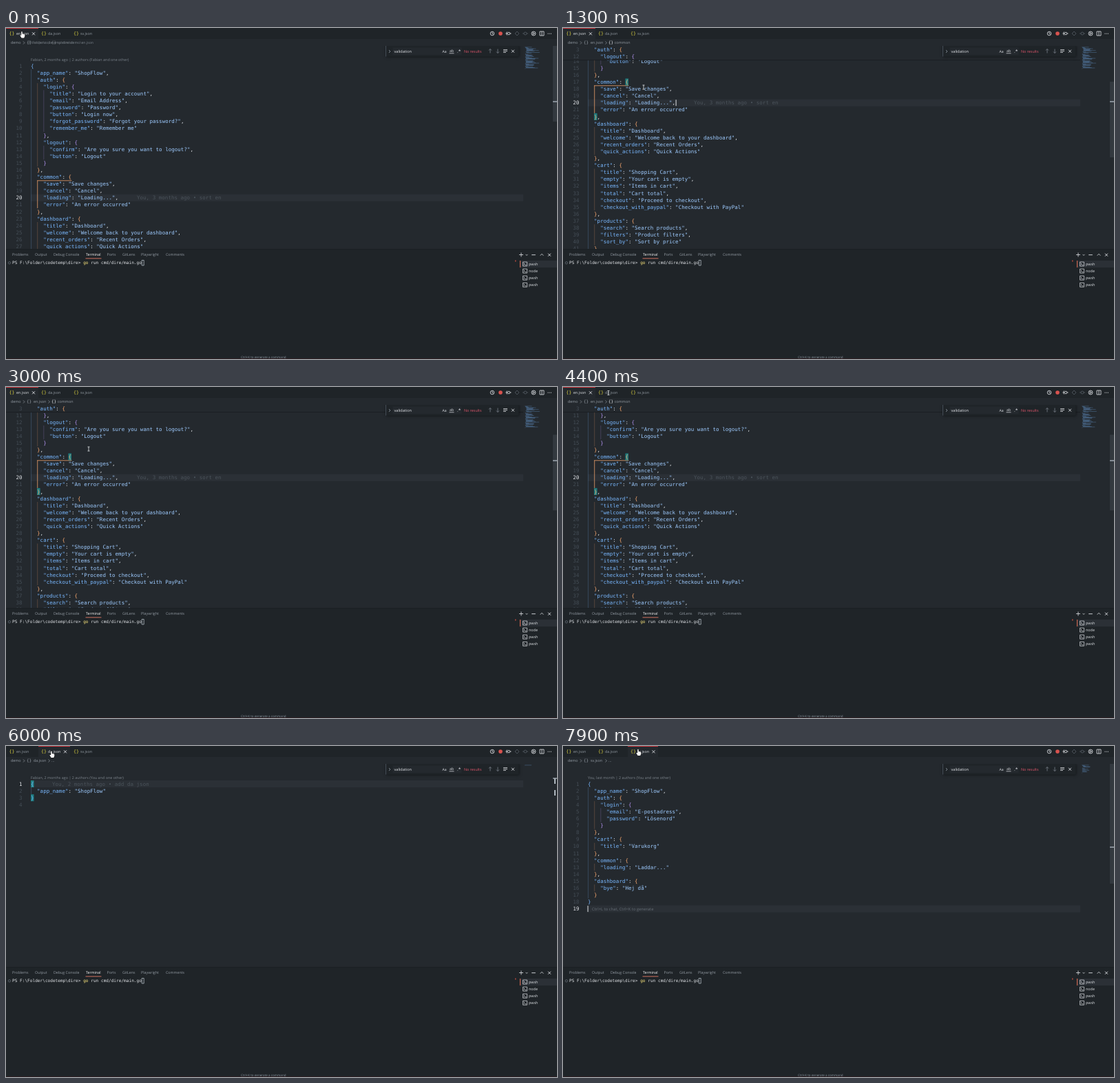
Animation, 800 px wide and 481 px high, one loop 8 s. Source, as an HTML page with a canvas:

```html
<!DOCTYPE html>
<html lang="en">
<head>
<meta charset="utf-8">
<style>
  html, body { margin: 0; overflow: hidden; background: #1f2428; }
  canvas { display: block; }
</style>
</head>
<body>
<canvas id="stage" width="800" height="481"></canvas>
<script>
const ctx = document.getElementById('stage').getContext('2d');
const LOOP = 8000, ROW = 10.09, FIRST = 55, TOP = 26, BOTTOM = 321, NOTCH = 23;
const CODE = 7.54, ADV = CODE * 0.602, LEFT = 36;
const MONO = '"DejaVu Sans Mono", monospace', UI = '"Open Sans", sans-serif';
const EDITOR = '#24292e', PANEL = '#1f2428', DIM = '#959da5', LIGHT = '#e1e4e8', FAINT = '#444d56';
const BRACKETS = ['#79b8ff', '#ffab70', '#b392f0'];

const english = {
  app_name: 'ShopFlow',
  auth: {
    login: {
      title: 'Login to your account', email: 'Email Address', password: 'Password',
      button: 'Login now', forgot_password: 'Forgot your password?', remember_me: 'Remember me'
    },
    logout: { confirm: 'Are you sure you want to logout?', button: 'Logout' }
  },
  common: { save: 'Save changes', cancel: 'Cancel', loading: 'Loading...', error: 'An error occurred' },
  dashboard: {
    title: 'Dashboard', welcome: 'Welcome back to your dashboard',
    recent_orders: 'Recent Orders', quick_actions: 'Quick Actions'
  },
  cart: {
    title: 'Shopping Cart', empty: 'Your cart is empty', items: 'Items in cart', total: 'Cart total',
    checkout: 'Proceed to checkout', checkout_with_paypal: 'Checkout with PayPal'
  },
  products: { search: 'Search products', filters: 'Product filters', sort_by: 'Sort by price' },
  orders: { status: 'Order status', tracking: 'Track your order', api_webhook: 'API webhook notifications' }
};
const swedish = {
  app_name: 'ShopFlow',
  auth: { login: { email: 'E-postadress', password: 'Lösenord' } },
  cart: { title: 'Varukorg' },
  common: { loading: 'Laddar...' },
  dashboard: { bye: 'Hej då' }
};

// Lines plus the bracket blocks {start, end, depth} they form
function parse(data) {
  const lines = (JSON.stringify(data, null, 2) + '\n').split('\n');
  const blocks = [], open = [];
  lines.forEach((line, i) => {
    if (line.endsWith('{')) open.push({ start: i, depth: open.length });
    if (/^ *}/.test(line)) blocks.push({ ...open.pop(), end: i });
  });
  return { lines, blocks };
}

const files = [
  { name: 'en.json', x: 0, w: 47, icon: 4.5, label: 15, close: 40, active: 19, mark: 107, slider: 110,
    lens: 'Fabian, 2 months ago | 2 authors (Fabian and one other)',
    note: 'You, 3 months ago • sort en', noteX: 190, caretX: 164, match: [16, 21], ...parse(english) },
  { name: 'da.json', x: 47, w: 46, icon: 51, label: 61, close: 86, active: 0, mark: 47, slider: 0,
    lens: 'Fabian, 2 months ago | 2 authors (You and one other)',
    note: 'You, 2 months ago • add da json', noteX: 67, caretX: 36, match: [0, 2], ...parse({ app_name: 'ShopFlow' }) },
  { name: 'sv.json', x: 94, w: 44, icon: 98, label: 108, close: 131.5, active: 18, mark: 147, slider: 174,
    lens: 'You, last month | 2 authors (You and one other)',
    hint: 'Ctrl+L to chat, Ctrl+K to generate', caretX: 36, match: [], ...parse(swedish) }
];

function rect(x, y, w, h, color) {
  ctx.fillStyle = color;
  ctx.fillRect(x, y, w, h);
}

// Drawn at ten times the size and scaled down, which keeps fractional advances
function text(str, x, y, color, size = 5.4, font = UI, align = 'left') {
  ctx.save();
  ctx.translate(x, y + size * 0.35);
  ctx.scale(0.1, 0.1);
  ctx.font = `${size * 10}px ${font}`;
  ctx.textRendering = 'geometricPrecision';
  ctx.textAlign = align;
  ctx.fillStyle = color;
  ctx.fillText(str, 0, 0);
  ctx.restore();
}

function stroke(d, color, width = 0.8, x = 0, y = 0) {
  ctx.save();
  ctx.translate(x, y);
  ctx.strokeStyle = color;
  ctx.lineWidth = width;
  ctx.stroke(new Path2D(d));
  ctx.restore();
}

const cross = (x, y, color = LIGHT) => stroke('M-2-2 2 2M2-2-2 2', color, 0.9, x, y);
const ring = r => `M${-r} 0a${r} ${r} 0 1 0 ${2 * r} 0a${r} ${r} 0 1 0 ${-2 * r} 0`;

function scrollAt(t) {
  const notches = (start, gap, count) => Math.max(0, Math.min(count, Math.floor((t - start) / gap) + 1));
  return NOTCH * (notches(700, 100, 6) + notches(1600, 80, 5) - notches(2450, 80, 6));
}

function codeLine(line, y) {
  const depth = line.search(/\S|$/) / 2;
  for (const { 0: token, index } of line.matchAll(/"[^"]*"|[{}]|[:,]/g)) {
    let color = LIGHT;
    if (token[0] === '"') color = line[index + token.length] === ':' ? '#79b8ff' : '#9ecbff';
    else if (/[{}]/.test(token)) color = BRACKETS[depth % 3];
    text(token, LEFT + index * ADV, y, color, CODE, MONO);
  }
}

function numbered(file, i, y) {
  text(i + 1, 23.5, y, i === file.active ? LIGHT : FAINT, CODE, MONO, 'right');
  codeLine(file.lines[i], y);
}

function drawEditor(file, scroll, t) {
  const yOf = i => FIRST + i * ROW - scroll;
  const activeY = yOf(file.active);
  ctx.save();
  ctx.beginPath();
  ctx.rect(0, TOP, 800, BOTTOM - TOP);
  ctx.clip();
  rect(LEFT, activeY - 5, 715, ROW, '#2b3036');
  text(file.lens, LEFT, 46 - scroll, '#7d858d', 5.4);

  for (const { start, end, depth } of file.blocks) {
    const x = LEFT + depth * 2 * ADV + 0.3, y = yOf(start) + 5;
    const active = depth === 1 && file.match[0] === start;
    ctx.globalAlpha = active ? 0.9 : 0.28;
    rect(x, y, 0.8, yOf(end) - 5 - y, BRACKETS[depth % 3]);
    if (active) rect(x, y, (file.lines[start].length - depth * 2) * ADV, 0.8, BRACKETS[depth]);
    ctx.globalAlpha = 1;
  }
  if (t >= 100) for (const i of file.match) {
    const col = file.lines[i].search(/[{}]/);
    rect(LEFT + col * ADV, yOf(i) - 5, ADV, ROW, '#17e5e670');
  }
  file.lines.forEach((_, i) => {
    const y = yOf(i);
    if (y > TOP - 6 && y < BOTTOM + 6) numbered(file, i, y);
  });
  if (file.note) text(file.note, file.noteX, activeY, '#4b535b', CODE, MONO);
  if (file.hint) text(file.hint, 42, activeY + 0.5, '#666e76', 5.9);

  const blink = t % 1000 >= 200 && t % 1000 < 700;
  if (file.hint || (blink && (t < 3700 || t >= 5000))) rect(file.caretX - 0.4, activeY - 4.5, 1, 9, LIGHT);

  // Headers of the blocks that have scrolled past the top
  const sticky = [1, 2].map(depth => {
    const rowTop = TOP + (depth - 1) * ROW;
    return file.blocks.find(b => b.depth === depth && yOf(b.start) - 5 < rowTop && yOf(b.end) - 5 > rowTop);
  }).filter(Boolean);
  if (sticky.length) {
    rect(0, TOP, 751, sticky.length * ROW, EDITOR);
    rect(0, TOP + sticky.length * ROW, 751, 1, '#1b1f23');
    sticky.forEach((b, i) => numbered(file, b.start, TOP + 5 + i * ROW));
  }

  // Minimap and scrollbar
  file.lines.forEach((line, i) => {
    const indent = line.search(/\S|$/);
    rect(753 + indent * 0.42, 27 + i * 0.7, (line.length - indent) * 0.42, 0.45, '#79b8ff90');
  });
  if (file.slider) rect(794, TOP + scroll * 0.377, 6, file.slider, '#6a737d38');
  rect(794, file.mark - 0.6, 6, 1.2, '#b9c4ce');
  if (file.name === 'da.json') {
    rect(796, 47, 2, 8, '#b0b8c0');
    rect(796, 64, 2, 8, '#b0b8c0');
  }
  ctx.restore();
}

function drawFind() {
  ctx.save();
  ctx.shadowColor = '#0008';
  ctx.shadowBlur = 4;
  rect(551.5, 26, 193, 15.5, PANEL);
  ctx.restore();
  rect(551, 26, 1, 15.5, FAINT);
  rect(561.5, 28.5, 100, 10.5, '#24292e');
  stroke('M-1-2 1 0-1 2', DIM, 0.8, 557, 34);
  text('validation', 563.5, 34, LIGHT, 5.6);
  text('Aa', 633.5, 34, LIGHT, 5.2);
  text('ab', 644, 33.5, LIGHT, 5.2);
  rect(643.5, 36.5, 7, 0.7, LIGHT);
  text('.*', 655, 34, LIGHT, 6.5);
  text('No results', 665, 34, '#e0566b', 5.4);
  stroke('M0 3V-3M-2-1 0-3 2-1', '#7d858d', 0.8, 703, 33.5);
  stroke('M0-3V3M-2 1 0 3 2 1', '#7d858d', 0.8, 714, 33.5);
  stroke('M-3-2H3M-3 0H3M-3 2H1', LIGHT, 0.8, 725, 33.5);
  cross(736, 33.7);
}

function drawHeader(file, t) {
  rect(0, 0, 800, 16, PANEL);
  rect(0, 16, 800, 10, EDITOR);
  for (const f of files) {
    const on = f === file;
    if (on) {
      rect(f.x, 0, f.w, 16, EDITOR);
      rect(f.x, 0, f.w, 1, '#c8353d');
      cross(f.close, 8.3);
    }
    text('{}', f.icon, 8, '#d9cf3f', 6.6, MONO);
    text(f.name, f.label, 8.5, on ? LIGHT : DIM);
  }

  stroke(ring(2.8) + 'M0-2V0.3L1.6 1', LIGHT, 0.8, 706, 8);
  ctx.fillStyle = '#d9534f';
  ctx.beginPath();
  ctx.arc(718, 8, 2.8, 0, 7);
  ctx.fill();
  stroke(ring(1.8) + 'M-4 0H-1.8M-2.5-2.5-4 0-2.5 2.5M1.8 0H3.6', LIGHT, 0.8, 730, 8);
  stroke('M0-3 3 0 0 3-3 0Z', '#565e66', 0.8, 742, 8);
  stroke(ring(2) + 'M-4 0H-2M2 0H4', '#565e66', 0.8, 754, 8);
  stroke(ring(3) + 'M-1-1.6 1.8 0-1 1.6Z', LIGHT, 0.8, 766, 8);
  stroke('M-3-3H3V3H-3ZM0-3V3', LIGHT, 0.8, 778, 8);
  for (const x of [787, 789.2, 791.4]) rect(x - 0.5, 7.7, 1, 1, LIGHT);

  text('demo', 7, 21.5, DIM);
  stroke('M-1-2 1 0-1 2', DIM, 0.7, 26, 21.5);
  text('{}', 30, 21, DIM, 6, MONO);
  text(file.name, 40, 21.5, DIM);
  stroke('M-1-2 1 0-1 2', DIM, 0.7, 62.5, 21.5);
  if (file === files[0]) {
    text('{}', 66, 21, LIGHT, 6, MONO);
    text('common', 75, 21.5, DIM);
  } else text('...', 66, 21.5, DIM);
  if (t < 100) {
    rect(36, 17, 92, 9, '#24292ea0');
    text('F:\\Folder\\codetemp\\dire\\demo\\en.json', 127, 21.5, '#7d858d', 5.2, UI, 'right');
  }
}

function drawPanel() {
  rect(0, BOTTOM, 800, 160, PANEL);
  rect(0, BOTTOM, 800, 1, '#1b1f23');
  const tabs = { Problems: 9, Output: 42, 'Debug Console': 69, Terminal: 116, Ports: 146.5, GitLens: 169, Playwright: 196, Comments: 232 };
  for (const [name, x] of Object.entries(tabs)) text(name, x, 329.5, name === 'Terminal' ? '#fff' : DIM, 5.3);
  rect(115.5, 334.5, 23, 0.8, '#f9826c');
  stroke('M-3 0H3M0-3V3', LIGHT, 0.8, 748, 329.5);
  stroke('M-1.5-0.8 0 0.8 1.5-0.8', LIGHT, 0.7, 756, 329.7);
  stroke('M-2.8 0H2.8', LIGHT, 0.9, 766, 329.7);
  stroke('M-2.3 1.2 0-1.2 2.3 1.2', LIGHT, 0.8, 778, 329.5);
  cross(789, 329.7);

  const size = 6.12, adv = size * 0.602;
  stroke(ring(1.7), '#6a737d', 0.7, 5, 341.3);
  text('PS F:\\Folder\\codetemp\\dire>', 9, 341.3, LIGHT, size, MONO);
  text('go', 9 + 28 * adv, 341.3, '#ffea7f', size, MONO);
  text('run cmd/dire/main.go', 9 + 31 * adv, 341.3, LIGHT, size, MONO);
  stroke('M197.2 337.5h3v7.5h-3Z', '#c8d1da', 0.7);

  rect(746, 338, 54, 10, '#2b3036');
  rect(746, 338, 1, 10, '#d9694f');
  rect(739, 337.5, 1.5, 2, '#b5493f');
  ['pwsh', 'node', 'pwsh', 'pwsh'].forEach((name, i) => {
    const y = 343 + i * 10.1;
    stroke('M-3-3H3V3H-3ZM-1.8-1.2-0.4 0-1.8 1.2M0 1.4H1.8', LIGHT, 0.7, 753.5, y);
    text(name, 759, y, LIGHT);
  });
  text('Ctrl+K to generate a command', 341, 478, '#8b949e', 4.6);
  rect(0, 480, 800, 1, '#2b1c20');
}

// Pointer stops: time, x, y
const stops = [[0, 24, 10], [200, 24, 10], [600, 117, 86], [2400, 117, 86], [2900, 120, 90], [3100, 120, 90],
  [3550, 66, 8.5], [4999, 66, 8.5], [5000, 67, 12.5], [6950, 67, 12.5], [7700, 110, 9.5], [8000, 110, 9.5]];

function drawPointer(t) {
  const i = stops.findIndex(s => s[0] > t);
  const [t0, x0, y0] = stops[i - 1], [t1, x1, y1] = stops[i];
  const k = (t - t0) / (t1 - t0), ease = k * k * (3 - 2 * k);
  const x = x0 + (x1 - x0) * ease, y = y0 + (y1 - y0) * ease;
  if (y > 18 || (t > 3200 && t < 5000)) {
    stroke('M-1.5-3H1.5M0-3V3M-1.5 3H1.5', '#e8ebee', 0.8, x, y);
    return;
  }
  const hand = new Path2D('M-1.8-4.6q.8-.7 1.5 0V-1.6q2.6 0 3.6 1.1V2L2.2 4.5H-1.4L-3.6 1Q-3.4-.3-1.8.8Z');
  ctx.save();
  ctx.translate(x, y);
  ctx.fillStyle = '#fff';
  ctx.strokeStyle = '#111';
  ctx.lineWidth = 1;
  ctx.stroke(hand);
  ctx.fill(hand);
  ctx.restore();
}

function draw(now) {
  const t = now % LOOP;
  const file = files[t < 5000 ? 0 : t < 7900 ? 1 : 2];
  rect(0, 0, 800, 481, EDITOR);
  drawEditor(file, file === files[0] ? scrollAt(t) : 0, t);
  drawFind();
  drawHeader(file, t);
  drawPanel();
  drawPointer(t);
}

let began;
function tick(now) {
  began ??= now;
  draw(Math.max(0, now - began));
  requestAnimationFrame(tick);
}
requestAnimationFrame(tick);
</script>
</body>
</html>
```
